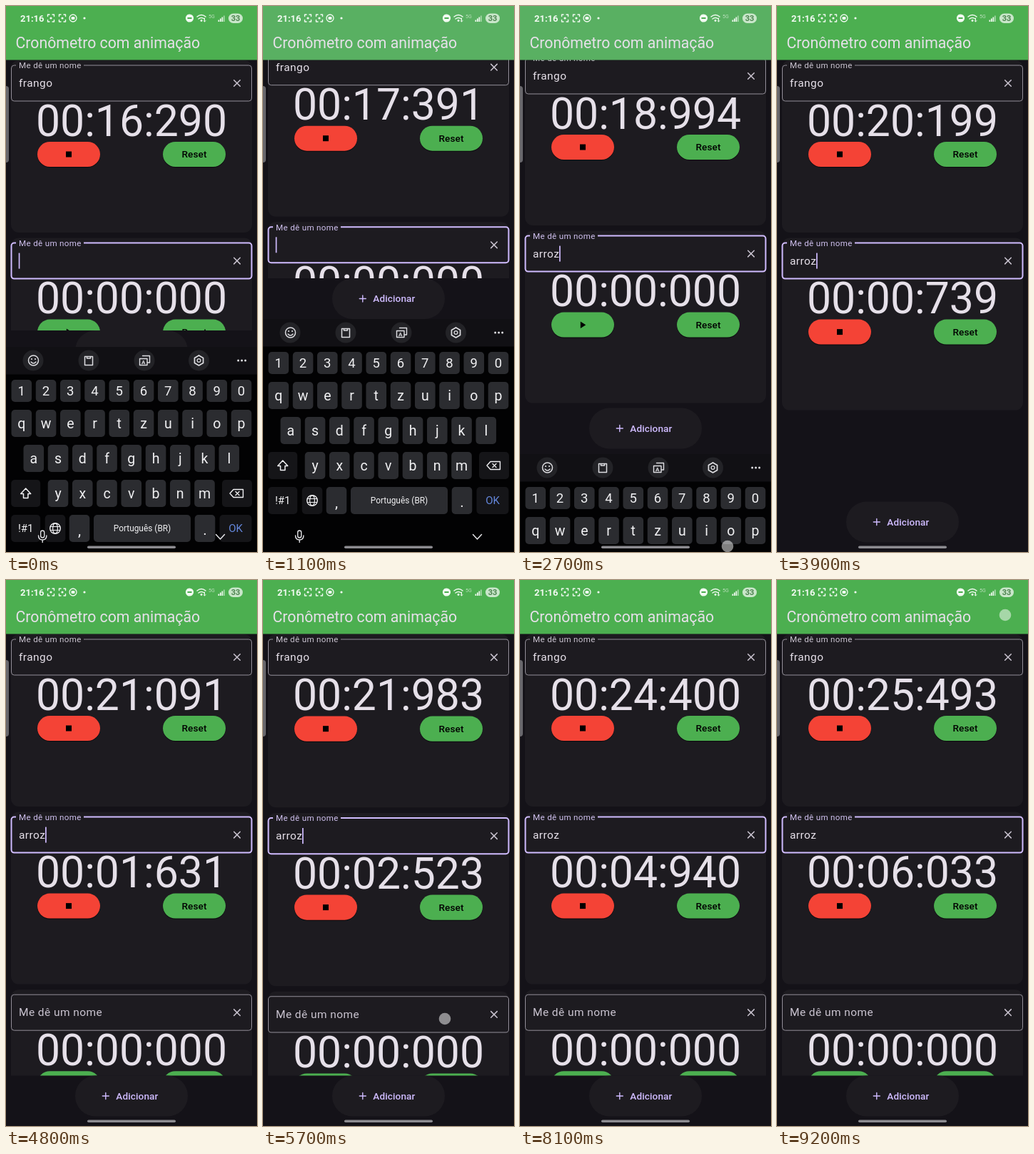
Write an HTML page that moves like this. It is 352 px wide and 764 px high and loops after 9300 ms.

```html
<!DOCTYPE html>
<html lang="pt-BR">
<head>
<meta charset="utf-8">
<title>Cronômetro com animação</title>
<style>
  html, body { margin: 0; width: 100%; height: 100%; overflow: hidden; background: #141218; }
  svg { display: block; width: 352px; height: 764px; font-family: Roboto, sans-serif; }
  .line { fill: none; stroke-linecap: round; stroke-linejoin: round; }
  .mid { text-anchor: middle; }
  .input { font-size: 15.46px; letter-spacing: .45px; fill: #e6e0e9; }
  .label { font-size: 11.6px; letter-spacing: .33px; }
  .time { font-size: 60.7px; fill: #e6e0e9; }
  .btn { font-size: 13.6px; font-weight: 500; letter-spacing: .1px; }
</style>
</head>
<body>
<svg id="stage" viewBox="0 0 352 764"></svg>
<script>
const LOOP = 9300, STEP = 100, PITCH = 248.6, CLIP_UP = 381;
const GREEN = '#4caf50', CARD = '#1d1b20', BG = '#141218', MUTED = '#cac4d0', LILAC = '#d0bcff';

const rect = (x, y, w, h, r, fill, extra = '') =>
  `<rect x="${x}" y="${y}" width="${w}" height="${h}" rx="${r}" fill="${fill}" ${extra}/>`;
const disc = (x, y, r, fill, extra = '') => `<circle cx="${x}" cy="${y}" r="${r}" fill="${fill}" ${extra}/>`;
const line = (d, color, w = 1.5) => `<path class="line" d="${d}" stroke="${color}" stroke-width="${w}"/>`;
const text = (x, y, s, cls, extra = '') => `<text x="${x}" y="${y}" class="${cls}" ${extra}>${s}</text>`;
const group = (id, body, extra = '') => `<g id="${id}" ${extra}>${body}</g>`;
const ring = (x, y, r, color, w) => disc(x, y, r, 'none', `stroke="${color}" stroke-width="${w}"`);

function card(i, name, focused) {
  const edge = focused ? LILAC : '#938f99', w = focused ? 2 : 1;
  const floated = focused || name;
  const label = floated
    ? rect(14, -3, 95, 6, 0, CARD) + text(18, 4.2, 'Me dê um nome', 'label', `fill="${focused ? '#cfc0ee' : MUTED}"`)
    : text(18, 30, 'Me dê um nome', 'input', `style="fill:${MUTED}"`);
  return group('card' + i,
    rect(7, -7, 338, 241, 11, CARD) +
    rect(7.5, 0, 337, 50, 4, 'none', `stroke="${edge}" stroke-width="${w}"`) + label +
    text(18, 30, name, 'input', `id="name${i}"`) +
    (focused ? rect(17.7, 14, 1.7, 22, 0, LILAC, 'id="caret"') : '') +
    line('M319.7 20.7l8.6 8.6m0-8.6l-8.6 8.6', MUTED, 1.5) +
    text(176, 98.6, '00:00:000', 'time mid', `id="time${i}"`) +
    rect(44, 108.2, 88, 35, 17.5, '#0e0d11') + rect(220, 108.2, 88, 35, 17.5, '#0e0d11') +
    rect(44, 107, 88, 35, 17.5, GREEN, `id="run${i}"`) + rect(220, 107, 88, 35, 17.5, GREEN) +
    `<path id="icon${i}" d=""/>` + text(264, 129.3, 'Reset', 'btn mid'),
    `transform="translate(0 ${83 + PITCH * i})"`);
}

function statusBar() {
  const w = '#f2faf2';
  const scan = x => line(`M${x - 4.5} 14.5v-2.5h2.5m4 0h2.5v2.5m0 5v2.5h-2.5m-4 0h-2.5v-2.5`, w, 1.4) + disc(x, 17, 1.6, w);
  return text(20, 21.5, '21:16', '', `fill="${w}" font-size="13" font-weight="700"`) +
    scan(63) + scan(79) + ring(94, 17, 5, w, 1.3) + rect(91.5, 15, 5, 4, 1, w) + disc(110, 17, 1.6, w) +
    disc(257.5, 17, 5.6, w) + rect(254.5, 16, 6, 2, 0, GREEN) +
    line('M268 15q6-5 12 0m-10 3q4-3 8 0', w, 1.5) + disc(274, 20.5, 1.4, w) + line('M278.5 17v5m-1.5-1.5l1.5 1.5 1.5-1.5', w, 1) +
    text(284, 16.5, '5G', '', 'fill="#b9dfbb" font-size="7"') +
    [0, 1, 2, 3].map(i => rect(297.5 + i * 2.5, 19.5 - i * 2, 1.7, 2.5 + i * 2, 0, i < 3 ? w : '#a6d7a8')).join('') +
    rect(312, 10.5, 20, 13.5, 6.7, '#c9e6ca') + text(322, 21.2, '33', 'mid', 'fill="#4d8450" font-size="11" font-weight="700"');
}

function keyboard() {
  const ink = '#f0f0f2', dark = '#151518', icon = '#dedee2';
  const key = (cx, cy, w, h, s, size = 19.5, fill = '#2b2c30', color = ink) =>
    rect(cx - w / 2, cy - h / 2, w, h, 5, fill) +
    text(cx, cy + size * .35, s, 'mid', `font-size="${size}" fill="${color}"`);
  const row = (keys, x, y, h, size) => [...keys].map((c, i) => key(x + i * 34.25, y, 28.6, h, c, size)).join('');
  return rect(0, 438, 352, 340, 0, '#111014') + rect(0, 476.5, 352, 330, 0, '#020203') +
    [38, 116, 194, 270.5].map(x => disc(x, 457, 14.5, '#232327')).join('') +
    ring(38.5, 457, 7, icon, 1.5) + disc(36, 455, 1.1, icon) + disc(41, 455, 1.1, icon) + line('M35 459q3.5 4 7 0', icon, 1.4) +
    line('M110.5 451.5h11v12h-11zM113.5 451.5v2.5h5v-2.5', icon, 1.5) +
    line('M191.5 450.5h10v9.500h-2.500M187.500 454.500h10.500v9h-10.500z', icon, 1.4) +
    text(192.7, 462.3, 'A', 'mid', `font-size="8" font-weight="700" fill="${icon}"`) +
    line([0, 1, 2, 3, 4, 5, 6].map(i => {
      const a = i * Math.PI / 3;
      return `${i ? 'L' : 'M'}${270.5 + 7 * Math.sin(a)} ${457 - 7 * Math.cos(a)}`;
    }).join(''), icon, 1.7) + ring(270.5, 457, 2.4, icon, 1.3) +
    [325.7, 330.7, 335.7].map(x => disc(x, 457, 1.5, icon)).join('') +
    row('1234567890', 21.8, 499.5, 31, 18.5) + row('qwertzuiop', 21.8, 545, 38) +
    row('asdfghjkl', 38.8, 594, 38) + row('yxcvbnm', 73, 643, 38) +
    key(27.700, 643, 41, 38, '', 19, dark) + line('M27.700 636l7 7.500h-3.800v6h-6.400v-6h-3.800z', ink, 1.5) +
    key(324, 643, 42, 38, '', 19, dark) + line('M319 637.500h13.500v11h-13.500l-5-5.500zM322 640.500l5 5m0-5l-5 5', ink, 1.4) +
    key(27.700, 692, 41, 38, '!#1', 15, dark) + key(69, 692, 28.6, 38, '', 19, dark) +
    ring(69, 692, 7.3, ink, 1.4) + `<ellipse cx="69" cy="692" rx="3.4" ry="7.300" fill="none" stroke="${ink}" stroke-width="1.2"/>` +
    line('M62.500 689.500h13m-13 5h13', ink, 1.1) +
    key(103, 692, 28.6, 38, '') + text(103, 702, ',', 'mid', `font-size="21" fill="${ink}"`) +
    key(191, 692, 136, 38, 'Português (BR)', 11.9) +
    key(279, 692, 28.6, 38, '') + text(279, 701, '.', 'mid', `font-size="21" fill="${ink}"`) +
    key(322, 692, 45, 38, 'OK', 15, dark, '#6487dc');
}

const $ = id => document.getElementById(id);
$('stage').innerHTML =
  rect(0, 0, 352, 764, 0, BG) +
  group('list', card(0, 'frango', false) + card(1, '', true) + card(2, '', false)) +
  group('panel', rect(0, 0, 352, 764, 0, BG) + rect(97, 0, 158, 57, 28.5, CARD) +
    rect(97, 0, 158, 57, 28.5, LILAC, 'id="ripple"') +
    line('M135.300 28.500h9m-4.500-4.500v9', LILAC, 1.4) + text(154.300, 33.2, 'Adicionar', 'btn', `fill="${LILAC}"`)) +
  rect(0, 0, 352, 75.5, 0, GREEN) + rect(0, 0, 352, 75.5, 0, LILAC, 'id="tint"') + statusBar() +
  text(13.5, 58.5, 'Cronômetro com animação', '', 'font-size="21.25" fill="#e6e0e9"') +
  group('keys', keyboard()) +
  group('extras', rect(48.700, 734, 5, 10, 2.5, 'none', 'stroke="#e4e4e8" stroke-width="1.4"') +
    line('M45.500 741q0 6 5.700 6t5.700-6m-5.700 6v3.500', '#e4e4e8', 1.4) + line('M294.500 739.500l6 6.500 6-6.500', '#e4e4e8', 1.5)) +
  rect(114, 755.5, 124, 3.6, 1.8, '#8c8b90') +
  rect(-4, 112, 8, 107, 4, '#68676c') +
  disc(0, 0, 8.3, '#fff', 'id="touch" fill-opacity=".5"');

// Linear value along a flat list of time, value pairs.
function at(t, p) {
  if (t <= p[0]) return p[1];
  for (let i = 2; i < p.length; i += 2)
    if (t <= p[i]) return p[i - 1] + (p[i + 1] - p[i - 1]) * (t - p[i - 2]) / (p[i] - p[i - 2]);
  return p[p.length - 1];
}

const CLOCK = [0, 16290, 1100, 17391, 2700, 18994, 3900, 20199, 5700, 21983, 6900, 23208, 9200, 25493];
const KEYS = [0, 39, 100, 12, 200, 0, 2400, 0, 2500, 12, 2600, 85, 2700, 189, 2800, 280, 2900, 328];
const CLIP = [0, 454, 100, 408, 200, 386, 300, CLIP_UP, 2400, CLIP_UP, 2500, 390, 2600, 455, 2700, 562.5, 2800, 650, 2900, 693.5];
const SCROLL = [200, 0, 400, 22.3];
const TINT = [200, 0, 400, .1, 2700, .1, 2900, 0];
const STRETCH = [5500, 0, 5700, .0052, 5800, .006, 6100, 0];
const TYPED = [1200, 1400, 1500, 1700, 1900];
// Each touch: start, end, x, y.
const TOUCHES = [
  [1200, 1300, 38, 594], [1400, 1450, 124, 545], [1500, 1600, 124, 545], [1700, 1800, 295, 545], [1900, 2000, 193, 545],
  [2500, 2800, 291, 756], [3100, 3200, 88, 456], [4400, 4500, 176, 722], [5600, 5900, 255, 614], [9200, 9300, 320, 49]
];
const STOP = 'M84 120.500h8v8h-8z', PLAY = 'M84.800 120l7.500 4.700-7.500 4.700z';

function clock(ms) {
  const n = (v, len) => String(Math.floor(v)).padStart(len, '0');
  return `${n(ms / 60000, 2)}:${n(ms / 1000 % 60, 2)}:${n(ms % 1000, 3)}`;
}
const show = (id, on) => $(id).setAttribute('opacity', +on);

function runButton(i, p) {
  const mix = (a, b) => Math.round(a + (b - a) * p);
  $('run' + i).setAttribute('fill', `rgb(${mix(76, 244)},${mix(175, 67)},${mix(80, 54)})`);
  $('icon' + i).setAttribute('d', p ? STOP : PLAY);
}

function caretOn(t) {
  if (t < 1200) return t < 300 || t >= 800;
  return t < 2000 || t % 1000 >= 500;
}

function render(t) {
  const ms = Math.round(at(t, CLOCK)), ms2 = Math.max(0, ms - 19460), clip = at(t, CLIP);
  $('time0').textContent = clock(ms);
  $('time1').textContent = clock(ms2);
  runButton(0, 1);
  runButton(1, Math.min(1, ms2 / 200));
  runButton(2, 0);

  $('name1').textContent = 'arroz'.slice(0, TYPED.filter(k => t >= k).length);
  $('caret').setAttribute('x', 17.7 + $('name1').getComputedTextLength());
  show('caret', caretOn(t));

  const scroll = Math.max(0, Math.min(at(t, SCROLL), t < 2400 ? 99 : 572.5 - clip)), s = at(t, STRETCH);
  $('list').setAttribute('transform', `matrix(1 0 0 ${1 + s} 0 ${-75 * s - scroll})`);
  show('card2', at(t, [4400, 0, 4700, 1]));
  $('panel').setAttribute('transform', `translate(0 ${clip})`);
  show('ripple', at(t, [4300, 0, 4400, .1, 4500, .1, 4800, 0]));
  show('tint', at(t, TINT));
  $('keys').setAttribute('transform', `translate(0 ${at(t, KEYS)})`);
  show('extras', t < 2500);

  const hit = TOUCHES.find(([a, b]) => t >= a && t < b);
  show('touch', !!hit);
  if (hit) $('touch').setAttribute('transform', `translate(${hit[2]} ${hit[3]})`);
}

const start = performance.now();
function tick() {
  const t = (performance.now() - start) % LOOP;
  render(Math.floor(t / STEP) * STEP);
  requestAnimationFrame(tick);
}
tick();
</script>
</body>
</html>
```
